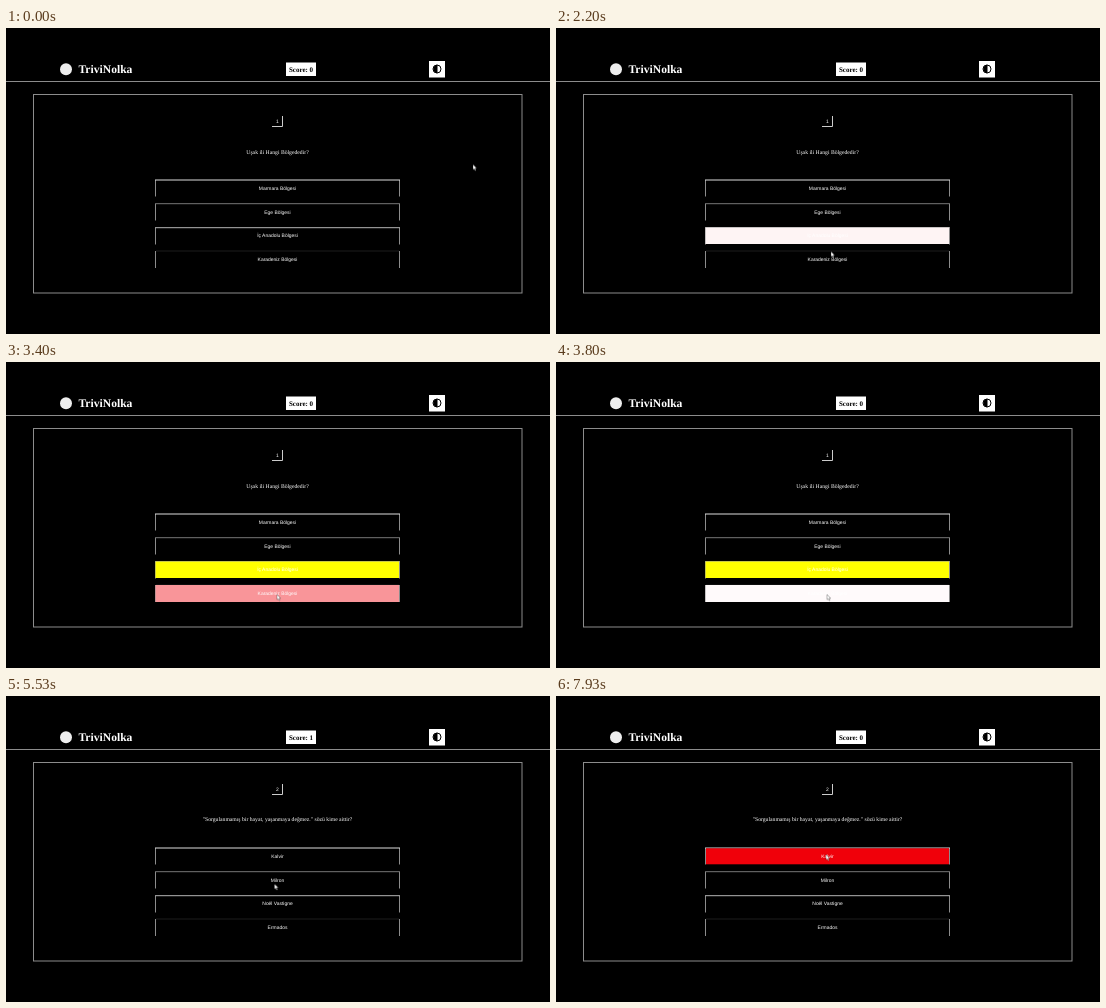
Recreate the animation shown at these times as an HTML page. Size 544 px wide and 306 px high, loop 8000 ms.

```html
<!DOCTYPE html>
<html lang="tr">
<head>
<meta charset="utf-8">
<title>TriviNolka</title>
<style>
  html, body { margin: 0; width: 100%; height: 100%; overflow: hidden; background: #000; }
  svg { display: block; width: 544px; height: 306px; }
  text { fill: #fff; text-rendering: geometricPrecision; }
  .serif { font-family: "Liberation Serif", "Times New Roman", serif; }
  .sans { font: 4.95px "Liberation Sans", Arial, sans-serif; }
  .mid { text-anchor: middle; }
  .title { font-size: 11.6px; font-weight: bold; }
  .score { font-size: 7px; font-weight: bold; fill: #000; }
  .ask { font-size: 5.7px; }
  .line { fill: none; stroke: #8c8c8c; }

  .first, .second, .zero, .one, .fill, #cursor { animation: 8s infinite; }
  .first { animation-name: first; animation-timing-function: step-end; }
  .second { animation-name: second; animation-timing-function: step-end; }
  .zero { animation-name: zero; animation-timing-function: step-end; }
  .one { animation-name: one; animation-timing-function: step-end; }
  @keyframes first { 0% { opacity: 1 } 60.8%, 100% { opacity: 0 } }
  @keyframes second { 0% { opacity: 0 } 60.8%, 100% { opacity: 1 } }
  @keyframes zero { 0% { opacity: 1 } 60.8% { opacity: 0 } 99%, 100% { opacity: 1 } }
  @keyframes one { 0% { opacity: 0 } 60.8% { opacity: 1 } 99%, 100% { opacity: 0 } }

  /* A wrong answer flashes red, fades to white, then stays yellow. */
  .fill { fill: transparent; animation-timing-function: step-end; }
  #a { animation-name: wrongA; }
  #c { animation-name: wrongC; }
  #d { animation-name: wrongD; }
  @keyframes wrongA { 0% { fill: transparent } 99%, 100% { fill: #f0000a } }
  @keyframes wrongC {
    0% { fill: transparent }
    19.95% { fill: #f0000a; animation-timing-function: ease }
    30.2% { fill: #fff }
    30.21% { fill: #ff0 }
    60.8%, 100% { fill: transparent }
  }
  @keyframes wrongD {
    0% { fill: transparent }
    39.05% { fill: #f0000a; animation-timing-function: ease }
    49.3% { fill: #fff }
    49.31% { fill: #ff0 }
    60.8%, 100% { fill: transparent }
  }

  #cursor { animation-name: roam; animation-timing-function: ease-in-out; }
  @keyframes roam {
    0%, .8% { transform: translate(467px, 136.5px) }
    5.87%, 8.3% { transform: translate(372px, 199.5px) }
    10% { transform: translate(374px, 197px) }
    14% { transform: translate(308px, 217px) }
    18.3%, 20.5% { transform: translate(282px, 209px); animation-timing-function: linear }
    27.5% { transform: translate(275px, 223.5px); animation-timing-function: linear }
    30% { transform: translate(273px, 229px) }
    36.6%, 48% { transform: translate(271px, 232.5px) }
    52.5% { transform: translate(331.5px, 144px) }
    59.1%, 68.3% { transform: translate(264px, 189px) }
    73% { transform: translate(333px, 172px) }
    79% { transform: translate(268px, 152px) }
    82.5% { transform: translate(277px, 145px) }
    86.5% { transform: translate(263px, 161px) }
    90%, 94.2% { transform: translate(269px, 158px) }
    96.6%, 100% { transform: translate(270px, 158.5px) }
  }
</style>
</head>
<body>
<svg viewBox="0 0 544 306">
  <circle cx="60" cy="41.3" r="6" fill="#eee"/>
  <text class="serif title" x="72.5" y="45">TriviNolka</text>
  <path class="line" d="M0 53.5H544"/>

  <path fill="#fff" d="M280 34.5h30v13.5h-30z M423 33h16v16.5h-16z"/>
  <text class="serif score mid zero" x="295" y="43.6">Score: 0</text>
  <text class="serif score mid one" x="295" y="43.6">Score: 1</text>
  <circle cx="431" cy="41" r="4" fill="none" stroke="#000"/>
  <path d="M431.5 36.8a4.2 4.2 0 0 0 0 8.4z"/>

  <rect class="line" x="27.5" y="66.5" width="488.5" height="198.5"/>
  <path fill="none" stroke="#ccc" d="M276.5 88V98.5H266"/>

  <g class="line">
    <path d="M149.5 152v16.5M393.5 152v16.5M149.5 176v16.5M393.5 176v16.5M149.5 200v16.5M393.5 200v16.5M149.5 223v17M393.5 223v17"/>
    <path stroke="#ddd" d="M149 152H394"/>
    <path stroke="#777" d="M149 175.7H394"/>
    <path stroke="#b5b5b5" d="M149 199.7H394"/>
    <path stroke="#1c1c1c" d="M150 223H393"/>
  </g>

  <rect class="fill" id="a" x="150" y="152.3" width="243" height="16"/>
  <rect class="fill" id="c" x="149.5" y="199.5" width="243.5" height="16.5"/>
  <rect class="fill" id="d" x="149.5" y="223" width="243.5" height="17"/>

  <g class="first mid">
    <text class="sans" x="271.3" y="95.3">1</text>
    <text class="serif ask" x="271.5" y="125.7">Uşak ili Hangi Bölgededir?</text>
    <text class="sans" x="271.5" y="161.8">Marmara Bölgesi</text>
    <text class="sans" x="271.5" y="185.7">Ege Bölgesi</text>
    <text class="sans" x="271.5" y="209.2">İç Anadolu Bölgesi</text>
    <text class="sans" x="271.5" y="232.9">Karadeniz Bölgesi</text>
  </g>
  <g class="second mid">
    <text class="sans" x="271.3" y="95.3">2</text>
    <text class="serif ask" x="271.5" y="125.3">"Sorgulanmamış bir hayat, yaşanmaya değmez." sözü kime aittir?</text>
    <text class="sans" x="271.5" y="161.8">Kalvir</text>
    <text class="sans" x="271.5" y="185.7">Milron</text>
    <text class="sans" x="271.5" y="209.2">Noël Vastigne</text>
    <text class="sans" x="271.5" y="232.9">Ermados</text>
  </g>

  <path id="cursor" fill="#fff" stroke="#000" stroke-width=".3" d="M0 0V5.2L1.2 4.2L2.1 6.2L3 5.8L2.2 3.8H3.8Z"/>
</svg>
</body>
</html>
```
